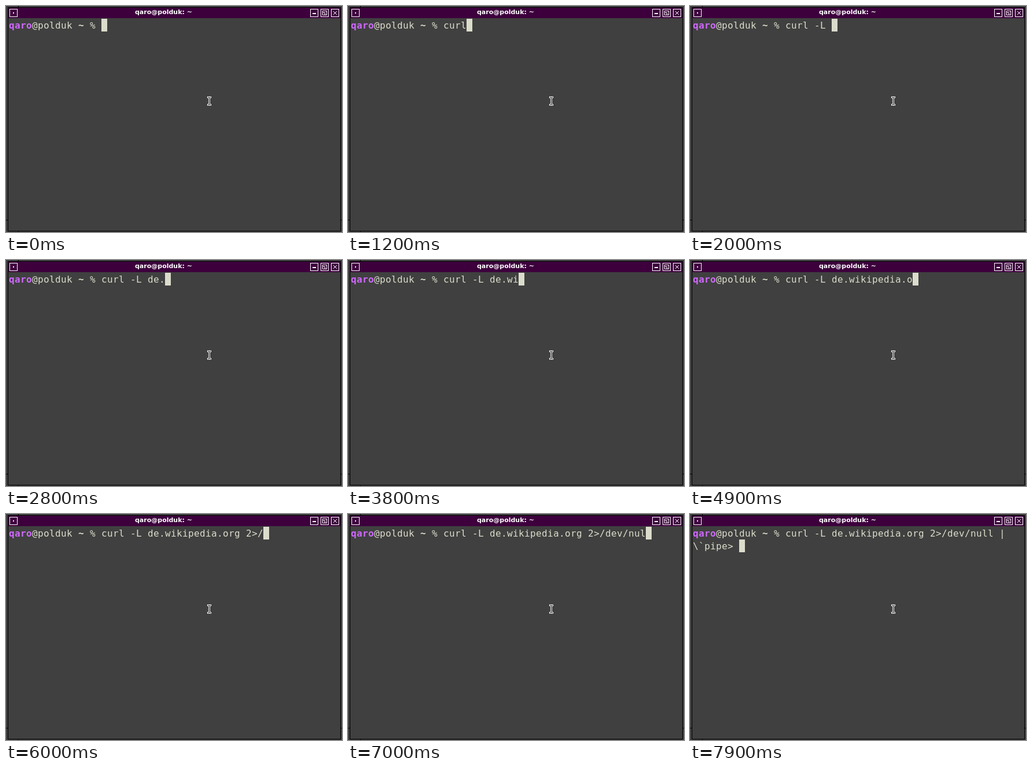
An HTML page that plays this animation: 581 px wide and 390 px high, repeating every 8000 ms.

```html
<!DOCTYPE html>
<html lang="en">
<head>
<meta charset="utf-8">
<title>Terminal</title>
<style>
  html, body { margin: 0; width: 100%; height: 100%; overflow: hidden; background: #404040; }
  svg { display: block; width: 581px; height: 390px; }
  .term { font: 16px "DejaVu Sans Mono", monospace; fill: #dcdccc; white-space: pre; }
  .bold { font-weight: bold; }
  .user { fill: #d068ff; }
  .title { font: bold 11px "DejaVu Sans", sans-serif; fill: #fff; }
  .line { fill: none; stroke: #fff; }
</style>
</head>
<body>
<svg viewBox="0 0 581 390" xmlns="http://www.w3.org/2000/svg">
  <defs>
    <rect id="box" y="5.5" width="13" height="13"/>
  </defs>
  <rect width="581" height="390" fill="#404040"/>

  <!-- window frame -->
  <g shape-rendering="crispEdges">
    <rect x="3.5" y="2.5" width="575" height="386" fill="none" stroke="#000"/>
    <path d="M21.5 0V2M21.5 388V390M0 369.5H4M578 369.5H581" fill="none" stroke="#000"/>
    <rect x="4" y="3" width="574" height="18" fill="#3d003d"/>
    <g class="line">
      <use href="#box" x="6.5"/>
      <use href="#box" x="526.5"/>
      <use href="#box" x="544.5"/>
      <use href="#box" x="562.5"/>
      <rect x="547.5" y="8.5" width="7" height="7"/>
      <rect x="547.5" y="11.5" width="4" height="4"/>
    </g>
    <rect x="12" y="11" width="2" height="2" fill="#fff"/>
    <rect x="530" y="12" width="6" height="2" fill="#fff"/>
  </g>
  <path class="line" d="M566 9L572 15M572 9L566 15"/>
  <text class="title" x="223" y="14">qaro@polduk: ~</text>

  <g id="screen" class="term"></g>
  <rect id="cursor" width="10" height="22" fill="#dcdccc" shape-rendering="crispEdges"/>

  <!-- mouse pointer -->
  <g fill="none" shape-rendering="crispEdges">
    <path d="M348 157.5H355M348 170.5H355M351.5 157V171" stroke="#fff" stroke-width="3"/>
    <path d="M349 157.5H351M352 157.5H354M349 170.5H351M352 170.5H354M351.5 158V170" stroke="#000"/>
  </g>
</svg>
<script>
const LOOP = 8000, STEP = 100, ENTER = 7900;
const CELL = 10, ROW = 22, LEFT = 5, TOP = 22, PROMPT = 16;

// Bursts of typing: start time, number of steps, keys ("<" is backspace).
const BURSTS = [
  [600, 3, "cur"], [1200, 2, "l "], [1500, 1, "-"], [2000, 1, "L "],
  [2500, 2, "de"], [2800, 1, "."], [3000, 3, "wki"], [3500, 2, "<<"],
  [3800, 5, "ikipe"], [4400, 4, "dia."], [4900, 3, "org "],
  [5500, 1, "2"], [5800, 1, ">"], [6000, 1, "/"], [6200, 3, "dev/"],
  [6600, 2, "nu"], [7000, 1, "l"], [7200, 2, "l "], [7500, 1, "|"]
];

const screen = document.getElementById("screen");
const cursor = document.getElementById("cursor");

// Text on the character grid, one x per character.
function addText(col, row, text, cls = "") {
  const node = document.createElementNS("http://www.w3.org/2000/svg", "text");
  node.setAttribute("class", cls);
  node.setAttribute("y", TOP + row * ROW + 17);
  screen.append(node);
  setText(node, col, text);
  return node;
}

function setText(node, col, text) {
  if (node.textContent === text) return;
  node.setAttribute("x", [...text].map((_, i) => LEFT + (col + i) * CELL).join(" "));
  node.textContent = text;
}

// The command line as it stands at time t.
function typedAt(t) {
  let line = "";
  for (const [start, steps, keys] of BURSTS) {
    if (t < start) break;
    const step = Math.min(steps, Math.floor((t - start) / STEP) + 1);
    const pressed = keys.slice(0, Math.floor(keys.length * step / steps));
    for (const key of pressed) line = key === "<" ? line.slice(0, -1) : line + key;
  }
  return line;
}

addText(0, 0, "qaro", "bold user");
addText(4, 0, "@polduk");
addText(12, 0, "~", "bold");
addText(14, 0, "%");
const command = addText(PROMPT, 0, "");
const nextPrompt = addText(0, 1, "");

function draw(t) {
  const line = typedAt(t);
  const entered = t >= ENTER;
  setText(command, PROMPT, line);
  setText(nextPrompt, 0, entered ? "\\`pipe>" : "");
  cursor.setAttribute("x", LEFT + (entered ? 8 : PROMPT + line.length) * CELL);
  cursor.setAttribute("y", TOP + (entered ? ROW : 0));
}

const start = performance.now();
function tick() {
  draw((performance.now() - start) % LOOP);
  requestAnimationFrame(tick);
}
draw(0);
requestAnimationFrame(tick);
</script>
</body>
</html>
```
